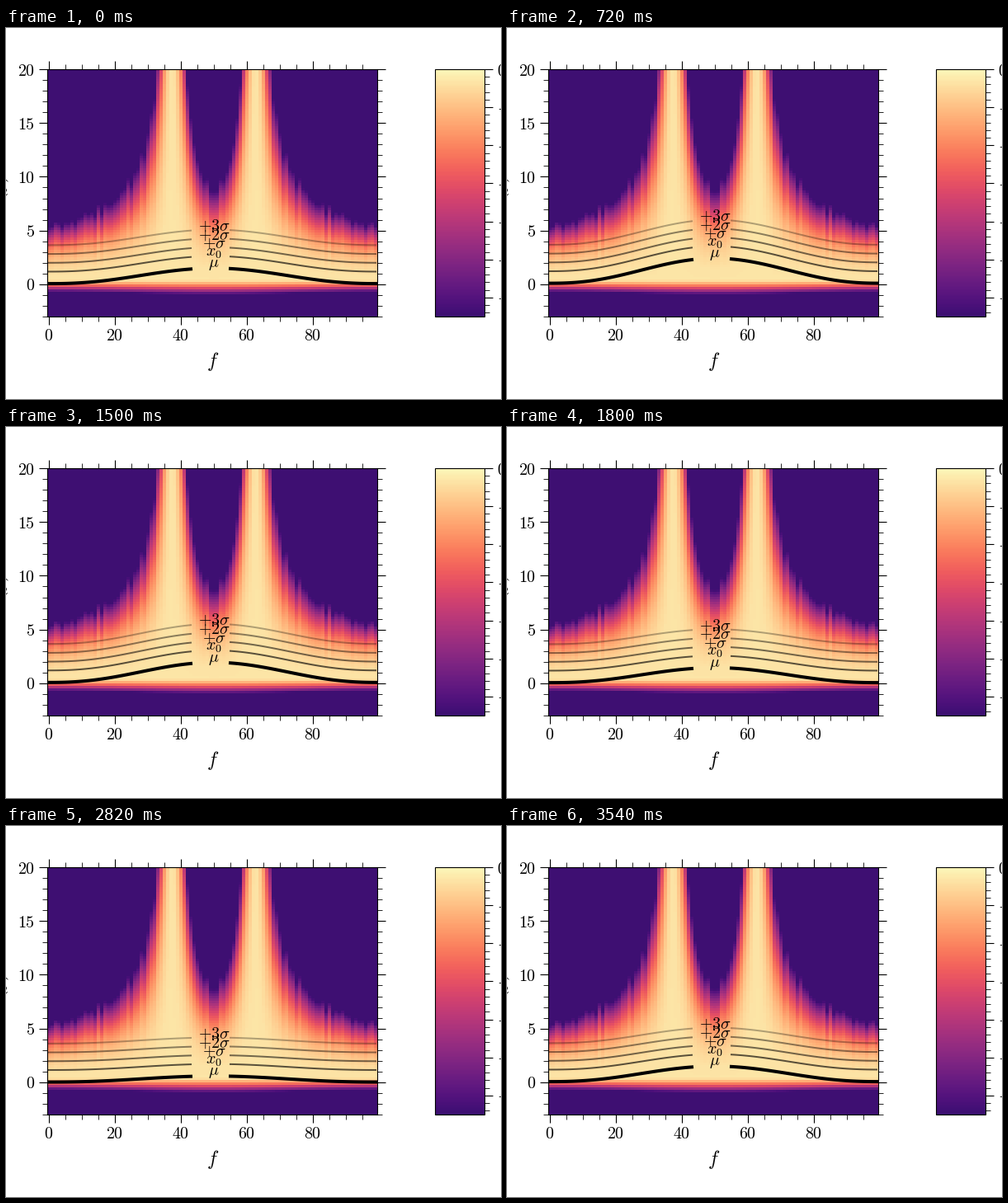
Animation of 600x450 px, one loop 3.6 s. Source, as a matplotlib script:

```python
import numpy as np
import matplotlib as mpl
import matplotlib.pyplot as plt
from matplotlib.animation import FuncAnimation
from matplotlib.colors import ListedColormap
from matplotlib.ticker import FuncFormatter, MultipleLocator

W, H, DPI = 600, 450, 100
PX = 72 / DPI          # points per pixel
FRAMES, INTERVAL = 60, 60
N = 100                # frequency bins and amplitude bins
Y_MIN, Y_MAX = -3, 20
LOG_MIN = -6.5

mpl.rcParams.update({
    "mathtext.fontset": "cm",
    "font.size": 20 * PX,
    "axes.linewidth": 0.8,
})


def box(x, y, w, h):
    """Pixel rectangle to figure fractions."""
    return [x / W, y / H, w / W, h / H]


def reach(f):
    """Amplitude at which the density fades out, with poles at 37.5 and 62.5."""
    g = np.minimum(f, N - f)
    d = np.abs(g - 37.5)
    outer = 3 + 17 * (4.9 / d) ** 0.96
    inner = 80.3 * (d ** -0.6 + np.abs(25 - d) ** -0.6) - 26.5
    return np.where(g < 37.5, outer, inner)


def log_density():
    rng = np.random.default_rng(4)
    f = np.arange(N)
    step = (Y_MAX - Y_MIN) / N
    y = (Y_MIN + step * (np.arange(N) + 0.5))[:, None]
    # ragged edge, mirrored like a real spectrum
    jitter = rng.normal(1, 0.035, N)
    edge = reach(f) * np.where(f <= N // 2, jitter, jitter[-f % N])
    upper = 1 - (np.clip(y, 0, None) / edge) ** 2.5
    foot = 1.1 + 0.25 * np.sin(np.pi * f / N) ** 2
    lower = 1 - (np.clip(0.4 - y, 0, None) / foot) ** 1.3
    v = 0.95 * np.clip(upper, 0, 1) * np.clip(lower, 0, 1)
    return LOG_MIN * (1 - np.maximum(v, 0.015))


def style_ticks(ax, **sides):
    ax.tick_params(which="major", length=10 * PX, width=0.8, pad=4.9 * PX, **sides)
    ax.tick_params(which="minor", length=6 * PX, width=0.6, **sides)


integer = FuncFormatter(lambda v, _: f"${round(v)}$")

fig = plt.figure(figsize=(W / DPI, H / DPI), dpi=DPI, facecolor="white")
ax = fig.add_axes(box(50, 100, 400, 300))
cax = fig.add_axes(box(520, 100, 60, 300))

cmap = ListedColormap(mpl.colormaps["magma"](np.linspace(0.2, 0.985, 256)))
im = ax.imshow(log_density(), origin="lower", aspect="auto", cmap=cmap,
               interpolation="nearest", vmin=LOG_MIN, vmax=0,
               extent=(-0.5, N - 0.5, Y_MIN, Y_MAX))

ax.xaxis.set_major_locator(MultipleLocator(20))
ax.xaxis.set_minor_locator(MultipleLocator(5))
ax.yaxis.set_major_locator(MultipleLocator(5))
ax.yaxis.set_minor_locator(MultipleLocator(1))
ax.xaxis.set_major_formatter(integer)
ax.yaxis.set_major_formatter(integer)
style_ticks(ax, top=True, right=True)
ax.tick_params(axis="x", pad=3.9 * PX)

bar = fig.colorbar(im, cax=cax)
bar.locator = MultipleLocator(1)
bar.minorlocator = MultipleLocator(0.2)
bar.formatter = integer
bar.update_ticks()
style_ticks(cax)

fig.text(251 / W, 46 / H, "$f$", fontsize=24 * PX, ha="center", va="center")
fig.text(-3 / W, 250 / H, "$x(f)$", fontsize=24 * PX, rotation=90,
         rotation_mode="anchor", ha="center", va="baseline")

freq = np.arange(N)
shape = 0.04 + 0.96 * np.sin(np.pi * freq / N) ** 2.4
gapped = np.where((freq > 43) & (freq < 55), np.nan, shape)

# label, offset above the mean, line width in pixels, opacity
CURVES = [
    (r"$\mu$", 0, 4, 1),
    (r"$x_0$", 1.12, 2, 0.65),
    (r"$+\sigma$", 1.94, 2, 0.55),
    (r"$+2\sigma$", 2.76, 2, 0.45),
    (r"$+3\sigma$", 3.58, 2, 0.3),
]
offsets = [c[1] for c in CURVES]
lines, labels = [], []
for name, _, width, alpha in CURVES:
    lines += ax.plot(freq, gapped, color="black", lw=width * PX, alpha=alpha)
    labels.append(ax.text(N / 2, 0, name, ha="center", va="center"))

ax.set_xlim(-0.5, N - 0.5)
ax.set_ylim(Y_MIN, Y_MAX)


def update(i):
    amp = 1.5 + 0.96 * np.sin(2 * np.pi * i / (FRAMES - 1))
    for line, label, offset in zip(lines, labels, offsets):
        line.set_ydata(amp * gapped + offset)
        label.set_y(amp + offset + 0.34)
    return lines + labels


anim = FuncAnimation(fig, update, frames=FRAMES, interval=INTERVAL,
                     repeat=True, repeat_delay=0)
plt.show()
```
